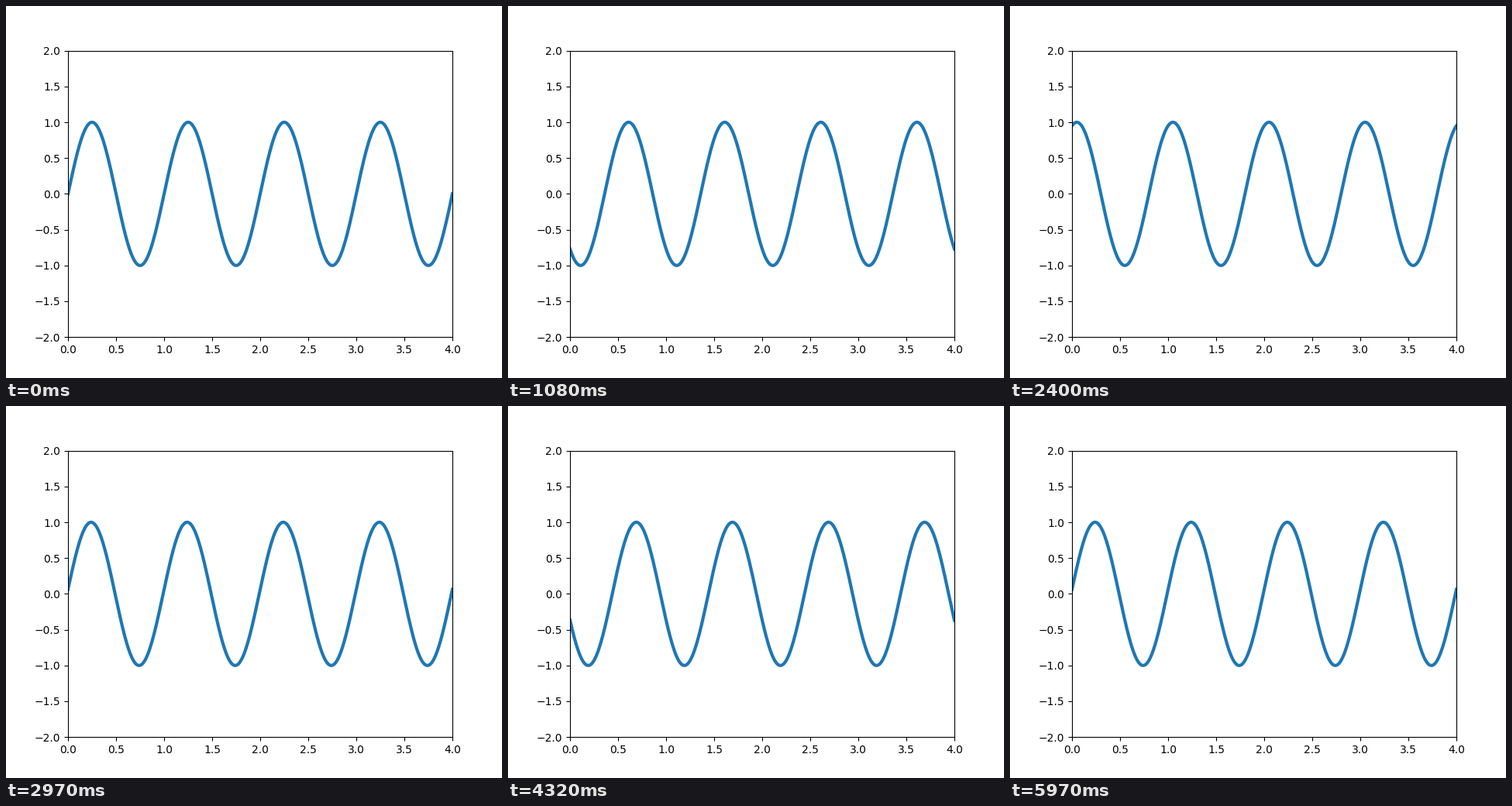
These frames come from a looping animation (640x480 px, 6000 ms). A matplotlib script:

```python
import numpy as np
import matplotlib.pyplot as plt
from matplotlib.animation import FuncAnimation

FRAMES = 200
INTERVAL = 30  # ms
PERIODS = 2    # wavelengths travelled per loop

fig = plt.figure(figsize=(6.4, 4.8), dpi=100)
ax = fig.add_subplot(xlim=(0, 4), ylim=(-2, 2))
x = np.linspace(0, 4, 1000)
line, = ax.plot(x, np.sin(2 * np.pi * x), lw=3)


def update(i):
    shift = PERIODS * i / FRAMES
    line.set_ydata(np.sin(2 * np.pi * (x - shift)))
    return line,


anim = FuncAnimation(fig, update, frames=FRAMES, interval=INTERVAL,
                     repeat=True, repeat_delay=0)
plt.show()
```
